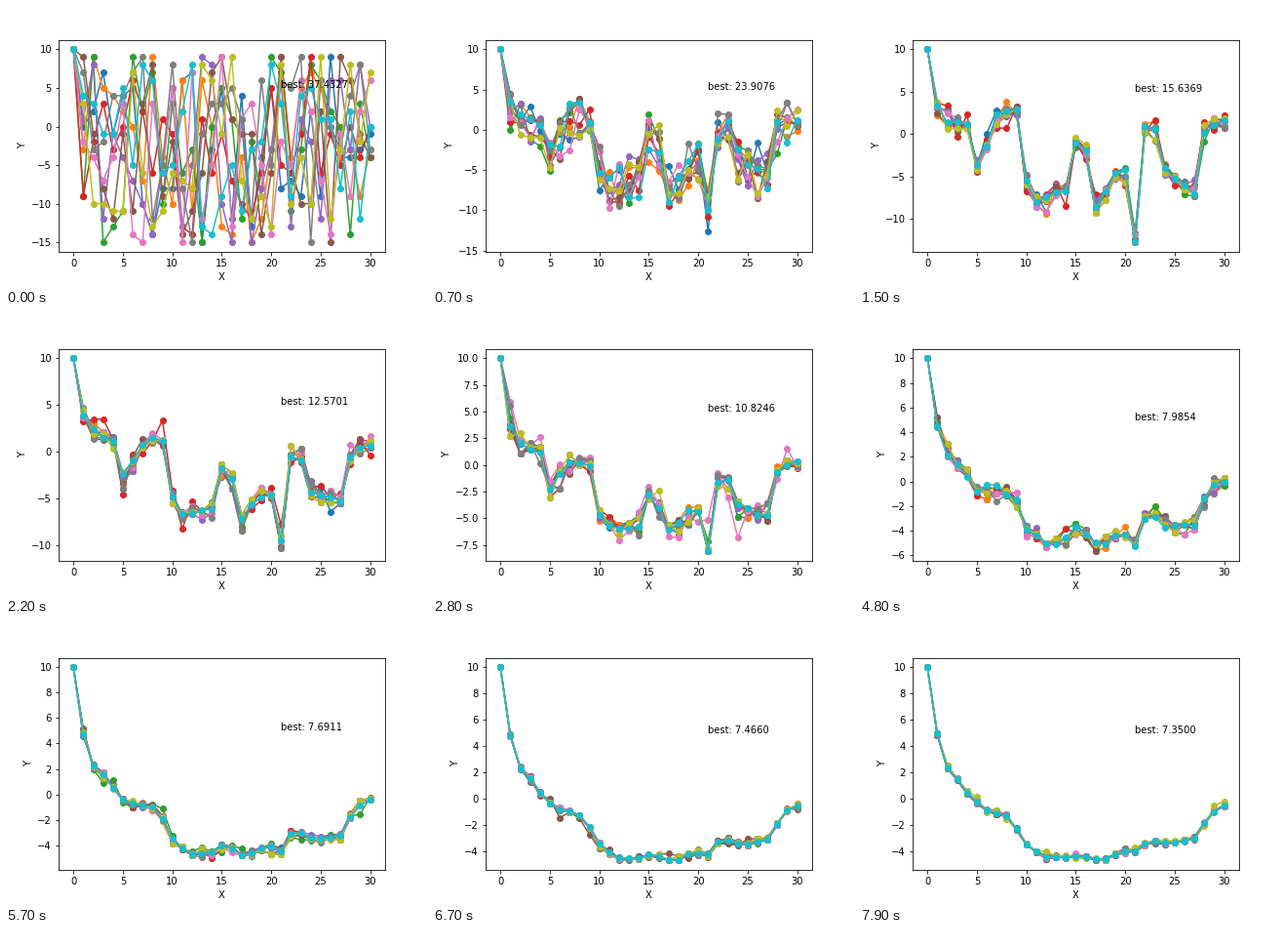
These frames come from a looping animation (432 by 288 pixels, 8 s). A matplotlib script:

```python
import numpy as np
import matplotlib.pyplot as plt
from matplotlib.animation import FuncAnimation

FRAMES, LINES, N = 80, 10, 31
SETTLED = 15  # frames until the random start has died out
x = np.arange(N)


def through(*points):
    return np.interp(x, *zip(*points))


# Best curve, and the kinks that fade away on the way to it
best = through((0, 10), (1, 4.9), (2, 2.4), (3, 1.5), (4, .5), (6, -.8), (8, -1.4), (10, -3.4),
               (12, -4.4), (18, -4.5), (23, -3.3), (25, -3.3), (27, -2.9), (29, -1), (30, -.6))
kinks = through((0, 0), (1, -1.4), (4, .7), (5, -3.7), (7, 2.9), (9, 5.3), (10, -2.4), (11, -4.2),
                (14, -2.1), (15, 3.7), (16, 2.2), (17, -4), (19, -.5), (20, -.5), (21, -9),
                (22, 4.6), (23, 3.7), (24, -1.2), (27, -4), (28, 2.5), (30, 2.2))
first = np.random.default_rng(7).integers(-15, 10, (LINES, N))


def score(f):
    keys = [0, 15, 28, 40, 48, 67, 79]
    values = [37.4327, 15.6369, 10.8246, 8.6676, 7.9854, 7.4660, 7.3500]
    # Log scale above the limit makes each stretch ease out
    return 7 + np.exp(np.interp(f, keys, np.log(np.array(values) - 7)))


def lowest(f):
    return np.interp(f, [0, 15, 27, 28, 40, 48, 67],
                     [-15, -12.78, -9.1, -8.08, -6.355, -5.66, -4.68])


def noise(f):
    """Individuals share genes: each point picks one of a few variants."""
    rng = np.random.default_rng(100 + f)
    variants = rng.normal(0, 1, (5, N))
    genes = np.take_along_axis(variants, rng.integers(0, 5, (LINES, N)), 0)
    stray = 3 * (f // 13) % LINES
    genes[stray] = rng.normal(0, 2, N)
    genes[-1] *= .4
    genes[:, 0] = 0
    return genes * (.09 + .5 / (1 + np.exp((f - 48) / 6)))


def population(f):
    target = best + kinks * np.exp(-max(0, f - SETTLED) / 17)
    start = np.exp(-(f / 5) ** 1.3)
    y = target + noise(f) * (1 - start) + (first - target) * start
    y[:, 0] = 10
    return np.clip(y, lowest(f), 10)


fig, ax = plt.subplots(figsize=(6, 4), dpi=72)
fig.subplots_adjust(left=.125, right=.9, bottom=.125, top=.88)
lines = [ax.plot(x, row, "o-")[0] for row in first]
label = ax.text(21, 5, "")
ax.set(xlabel="X", ylabel="Y", xlim=(-1.5, 31.5))


def update(f):
    for line, row in zip(lines, population(f)):
        line.set_ydata(row)
    low = lowest(f)
    pad = .05 * (10 - low)
    ax.set_ylim(low - pad, 10 + pad)
    label.set_text(f"best: {score(f):.4f}")
    return [*lines, label]


anim = FuncAnimation(fig, update, frames=FRAMES, interval=100, repeat=True, repeat_delay=0)
plt.show()
```
